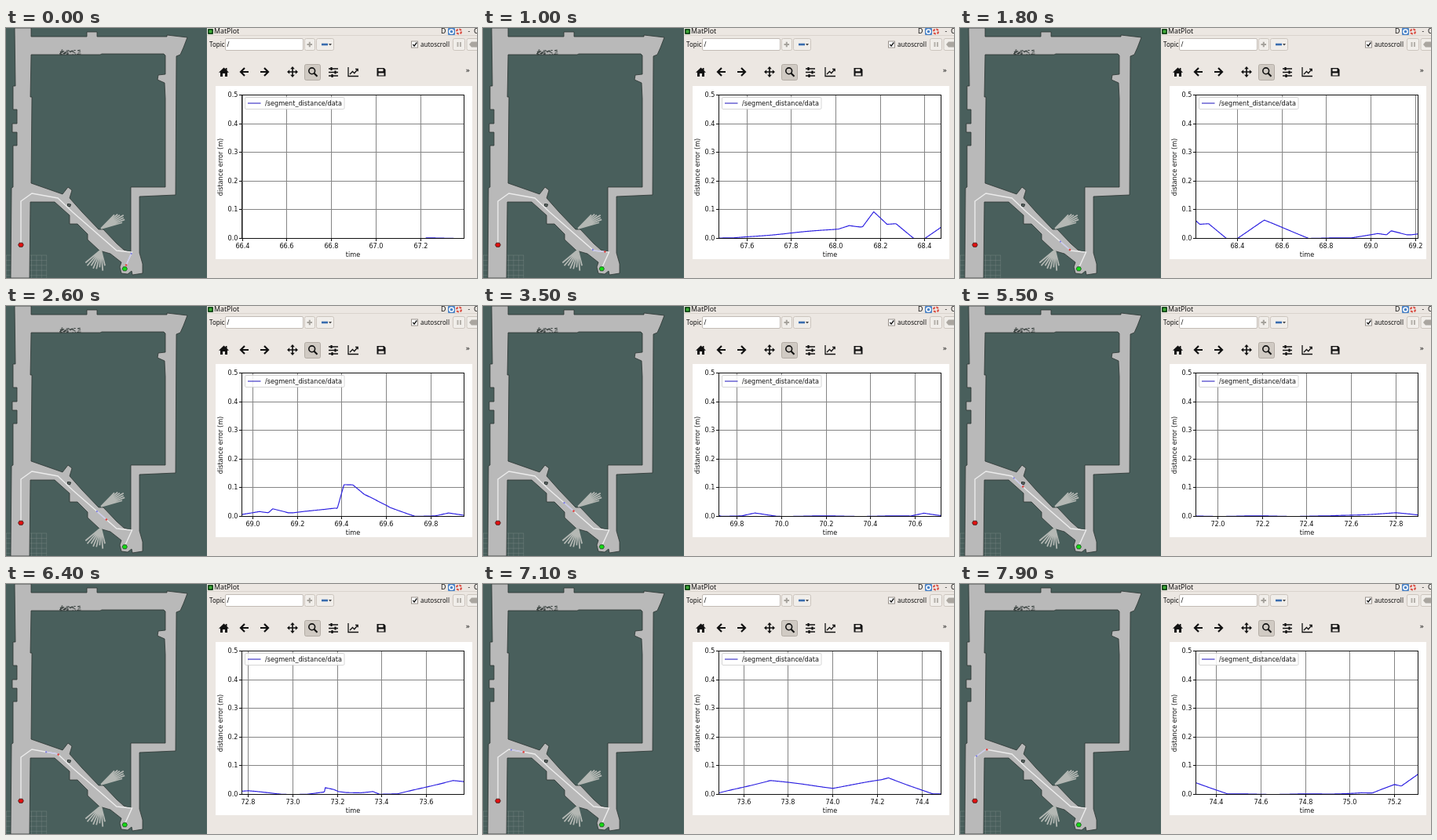
An HTML page that plays this animation: 600 px wide and 319 px high, repeating every 8 s.

```html
<!DOCTYPE html>
<html lang="en">
<head>
<meta charset="utf-8">
<title>Path following error</title>
<style>
  html, body { margin: 0; width: 100%; height: 100%; overflow: hidden; background: #495f5c; }
  svg { display: block; width: 100%; height: 100%; }
  text { font: 8.15px "DejaVu Sans", sans-serif; fill: #111; }
  .ui { font-family: "Noto Sans", "Open Sans", sans-serif; font-size: 8px; }
  .title { font-size: 8.8px; }
  .mid { text-anchor: middle; }
  .end { text-anchor: end; }
  .edge { stroke: #2b3432; stroke-width: .8; stroke-linejoin: round; }
  .grid { stroke: #858585; }
  .tick { stroke: #111; }
  .btn { fill: #f1eeea; stroke: #c3bcb4; stroke-width: .8; }
  .icon { fill: none; stroke: #111; stroke-width: 1.6; }
  .thin { stroke-width: 1.3; }
  .bold { stroke-width: 2.2; }
</style>
</head>
<body>
<svg viewBox="0 0 600 319" preserveAspectRatio="none">
  <defs><clipPath id="axes"><rect x="300.5" y="84" width="283.5" height="185"/></clipPath></defs>

  <!-- map: floor, then the area enclosed by the corridors -->
  <rect width="256" height="319" fill="#495f5c"/>
  <path id="cells" fill="none" stroke="#7f8b89" stroke-width=".5" opacity=".75"/>
  <path class="edge" fill="#b9b9b9" d="M11 0H32V11H103V5H116V11H205V9L231 12L226 25L222 34L217 36L216 213L170 215V287L174 301V313L161 315L160 310L155 314L147 313L145 305L147 299L133 288L119 284L104 270V263L91 250H81V239L62 222H31L30 319H6L7 204L9 203V150H14V133H8V122H14V104H9V74H12Z"/>
  <path class="edge" fill="#495f5c" d="M32 34H120L122 33H201L203 35V59L194 60L193 66L202 70L203 90V203H159V286L150 283L141 275L124 257H118L97 235L81 217L84 207L79 203L72 212L32 198L33 88H31Z"/>
  <path id="rays" stroke="#b4b8b4" stroke-width="1.8" fill="none"/>
  <path id="specks" stroke="#2b3432" stroke-width=".9" fill="none"/>
  <path fill="#66706d" stroke="#222b29" d="M78.500 224.500l4 .5l-1 3l-3-1z"/>
  <path id="route" fill="none" stroke="#ececec" stroke-width="1.4" d="M151 307L160.500 286L141 284L85 235L66 217L33 211L19 221V277"/>
  <path id="ahead" fill="none" stroke="#c9c9ea" stroke-width="1.4"/>
  <circle id="target" r="1.1" fill="#7777e4"/>
  <circle id="robot" r="1.3" fill="#e0433f"/>
  <path fill="#e01010" stroke="#3b1a17" stroke-width=".8" d="M17 274.200h4l1.300 2.600l-1.300 2.500h-4l-1.400-2.500z"/>
  <path fill="#14dc14" stroke="#17421b" stroke-width=".8" d="M149.500 304.800h3.600l1.300 2.500l-1.300 2.500h-3.600l-1.400-2.500z"/>

  <!-- window -->
  <rect x="256" width="344" height="319" fill="#ece7e2"/>
  <path d="M256 9.500H600" stroke="#dad4cd"/>
  <rect x="257" y="1" width="7" height="7" rx="1" fill="#174a1c"/>
  <circle cx="260.500" cy="4.500" r="2" fill="#3cab35"/>
  <text class="ui title" x="265" y="7.300">MatPlot</text>
  <text class="ui title" x="554" y="7.300">D</text>
  <rect x="563" y="0" width="9" height="9" rx="1" fill="#4b83c6"/>
  <circle cx="567.500" cy="4.500" r="2.600" fill="none" stroke="#fff" stroke-width="1.500"/>
  <circle cx="577" cy="4.500" r="3" fill="none" stroke="#d94a40" stroke-width="2.200" stroke-dasharray="3 1.700"/>
  <text class="ui" x="588.500" y="7">-</text>
  <text class="ui title" x="596" y="7.300">O</text>

  <text class="ui" x="259" y="24">Topic</text>
  <rect x="279.500" y="13.500" width="99" height="15" rx="1.500" fill="#fff" stroke="#b5aea6" stroke-width=".8"/>
  <text class="ui" x="281.500" y="23.700">/</text>
  <rect class="btn" x="380.500" y="13.500" width="13" height="15" rx="2"/>
  <path d="M383.500 21h6.500M386.800 17.800v6.500" stroke="#a5a29c" stroke-width="2"/>
  <rect class="btn" x="395.500" y="13.500" width="22" height="15" rx="2"/>
  <path d="M402 21h8" stroke="#386cae" stroke-width="2.600"/>
  <path d="M411 20h4l-2 2.500z" fill="#444"/>
  <rect x="516.500" y="17" width="8" height="8" fill="#fff" stroke="#8e8780" stroke-width=".9"/>
  <path d="M518.300 21l1.800 2l3.200-4.500" fill="none" stroke="#111" stroke-width="1.300"/>
  <text class="ui" x="528" y="23.700">autoscroll</text>
  <rect class="btn" x="569.500" y="13.500" width="15" height="15" rx="2"/>
  <path d="M575.500 18v6M579 18v6" stroke="#b5b1ab" stroke-width="2"/>
  <rect class="btn" x="587" y="13.500" width="16" height="15" rx="2"/>
  <path d="M590 21l3-3.500h7v7h-7z" fill="#aaa6a0"/>

  <!-- toolbar -->
  <path fill="#111" d="M271 56.700L277.500 50.500L279.800 52.500V51H281.500V54.200L284 56.700H282V62H279V58H276V62H273V56.700Z"/>
  <path id="arrow" class="icon bold" d="M309 56H299.500M304 51L299 56L304 61"/>
  <use href="#arrow" transform="matrix(-1 0 0 1 633 0)"/>
  <path class="icon" d="M360 56H370M365 51V61"/>
  <path fill="#111" d="M365 49l2.800 3.200h-5.600zM365 63l2.800-3.200h-5.600zM358 56l3.200-2.800v5.600zM372 56l-3.200-2.800v5.600z"/>
  <rect x="380.500" y="46.500" width="20" height="20" rx="2" fill="#d0cac3" stroke="#aaa39b" stroke-width=".8"/>
  <circle class="icon" cx="389.700" cy="54.800" r="3.900"/>
  <path class="icon bold" d="M392.500 57.800l4 4"/>
  <path class="icon thin" d="M411 52h12M411 56.500h12M411 61h12"/>
  <path class="icon bold" d="M414.500 50v4M419.500 54.500v4M415.500 59v4"/>
  <path class="icon thin" d="M436 50V61.500H449M438 59L441.500 55.500L443.800 57.700L448 52.500M445 52.300h3.200v3"/>
  <path fill="#111" fill-rule="evenodd" d="M472.500 51h9l2 2v8.500h-11zM474.500 52.300v3h6v-3zM474.500 57.500v3h7v-3z"/>
  <text x="585.500" y="57" style="font-size:9px">»</text>

  <!-- plot -->
  <rect x="267" y="74" width="327" height="221" fill="#fff"/>
  <g id="xAxis"></g>
  <g id="yAxis"></g>
  <path id="curve" clip-path="url(#axes)" fill="none" stroke="#291de0" stroke-width="1.150" stroke-linejoin="round"/>
  <rect x="300.500" y="85.500" width="283" height="183" fill="none" stroke="#111"/>
  <rect x="304.500" y="88.500" width="126.500" height="15" rx="1.500" fill="#fff" fill-opacity=".85" stroke="#ccc" stroke-width=".8"/>
  <path d="M308 96H324.500" stroke="#3027c2" stroke-width="1.100"/>
  <text x="330" y="98.800">/segment_distance/data</text>
  <text class="mid" x="442" y="292">time</text>
  <text class="mid" transform="translate(276 177.500) rotate(-90)">distance error (m)</text>
</svg>

<script>
const LOOP = 8000, STEP = 100;
const LEFT = 300.7, RIGHT = 584, BASE = 268.5, PX_PER_S = 283.5, PX_PER_MM = .366;
const FIRST_SAMPLE = 67.222, SPEED = 21.55, LEAD = 16;
const el = id => document.getElementById(id);
const setPath = (id, d) => el(id).setAttribute('d', d);

// The recorded clock runs unevenly: [playback ms, clock at the plot's right edge].
const clockKeys = [
  [0, 67.398], [1000, 68.475], [2600, 69.952], [3500, 70.719],
  [4600, 72.032], [6400, 73.772], [7900, 75.308]
];

// Error peaks: [clock, height in mm, rise in s, fall in s].
const peaks = [
  [68.06, 9, .05, .05], [68.17, 48, .05, .06], [68.27, 50, .73, .08], [68.52, 62, .12, .2],
  [69.03, 17, .12, .15], [69.09, 14, .02, .07], [69.37, 29, .3, .25], [69.41, 86, .03, .32],
  [69.45, 14, .04, .05], [69.88, 10, .06, .1], [70.64, 11, .06, .1], [71.04, 6, .2, .12],
  [71.35, 12, .11, .06], [71.51, 7, .03, .18], [72.8, 11, .3, .15], [73.145, 15, .003, .06],
  [73.185, 10, .12, .12], [73.36, 10, .12, .03], [73.72, 48, .25, .5], [74.25, 57, .25, .2],
  [75.05, 5, .15, .15], [75.2, 33, .1, .2], [75.34, 80, .11, .1]
];

function clockAt(ms) {
  const i = Math.max(1, clockKeys.findIndex(key => key[0] >= ms));
  const [t0, c0] = clockKeys[i - 1], [t1, c1] = clockKeys[i];
  return c0 + (c1 - c0) * (ms - t0) / (t1 - t0);
}

function errorAt(clock) {
  const ripple = 1 + Math.sin(clock * 19);
  return peaks.reduce((sum, [mid, height, rise, fall]) => {
    const away = clock < mid ? (mid - clock) / rise : (clock - mid) / fall;
    return sum + height * Math.max(0, 1 - away);
  }, ripple);
}

function seeded(seed) {
  return () => (seed = (seed * 16807) % 2147483647) / 2147483647;
}

function fan(x, y, from, to, count, reach) {
  const rnd = seeded(count * 71);
  let d = '';
  for (let i = 0; i < count; i++) {
    const a = (from + (to - from) * i / (count - 1)) * Math.PI / 180;
    const r = reach * (.72 + .28 * rnd());
    d += `M${x} ${y}L${x + r * Math.cos(a)} ${y + r * Math.sin(a)}`;
  }
  return d;
}

function drawMapDetails() {
  let cells = '';
  for (let k = 0; k < 9; k++) cells += `M${k * 6.4 + .5} 290V319`;
  for (let y = 290; y < 319; y += 6.4) cells += `M0 ${y}H52`;
  setPath('cells', cells);
  setPath('rays', fan(121, 256, -46, -16, 7, 34) + fan(121, 283, 76, 140, 8, 29));

  const rnd = seeded(29);
  let specks = '';
  for (let i = 0; i < 46; i++) {
    specks += `M${68 + 26 * rnd()} ${28 + 6 * rnd()}h${.8 + 2 * rnd()}`;
  }
  setPath('specks', specks);
}

function drawYAxis() {
  let html = '';
  for (let k = 0; k <= 5; k++) {
    const y = Math.round(268 - k * 36.6) + .5;
    html += `<path class="grid" d="M301 ${y}H584"/><path class="tick" d="M297 ${y}H301"/>` +
      `<text class="end" x="295.500" y="${y + 2.7}">${(k / 10).toFixed(1)}</text>`;
  }
  el('yAxis').innerHTML = html;
}

function drawPlot(right) {
  const left = right - 1;
  let html = '';
  for (let k = Math.ceil(left * 5); k / 5 <= right; k++) {
    const x = Math.floor(LEFT + (k / 5 - left) * PX_PER_S) + .5;
    html += `<path class="grid" d="M${x} 85V268"/><path class="tick" d="M${x} 268V272"/>` +
      `<text class="mid" x="${x}" y="280.500">${(k / 5).toFixed(1)}</text>`;
  }
  el('xAxis').innerHTML = html;

  const points = [];
  for (let x = LEFT; x <= RIGHT; x++) {
    const clock = left + (x - LEFT) / PX_PER_S;
    if (clock >= FIRST_SAMPLE) points.push(`${x} ${(BASE - errorAt(clock) * PX_PER_MM).toFixed(2)}`);
  }
  setPath('curve', 'M' + points.join('L'));
}

const route = el('route');
function place(id, s) {
  const p = route.getPointAtLength(s);
  el(id).setAttribute('cx', p.x);
  el(id).setAttribute('cy', p.y);
}

function drawRobot(s) {
  place('robot', s);
  place('target', s + LEAD);
  el('ahead').setAttribute('stroke-dasharray', `0 ${s} ${LEAD} 999`);
}

let shown = -1;
function frame(now) {
  const ms = Math.floor(Math.max(0, now - start) % LOOP / STEP) * STEP;
  if (ms !== shown) {
    shown = ms;
    const clock = clockAt(ms);
    drawPlot(clock);
    drawRobot(5 + (clock - clockKeys[0][1]) * SPEED);
  }
  requestAnimationFrame(frame);
}

drawMapDetails();
drawYAxis();
setPath('ahead', route.getAttribute('d'));
const start = performance.now();
frame(start);
</script>
</body>
</html>
```
